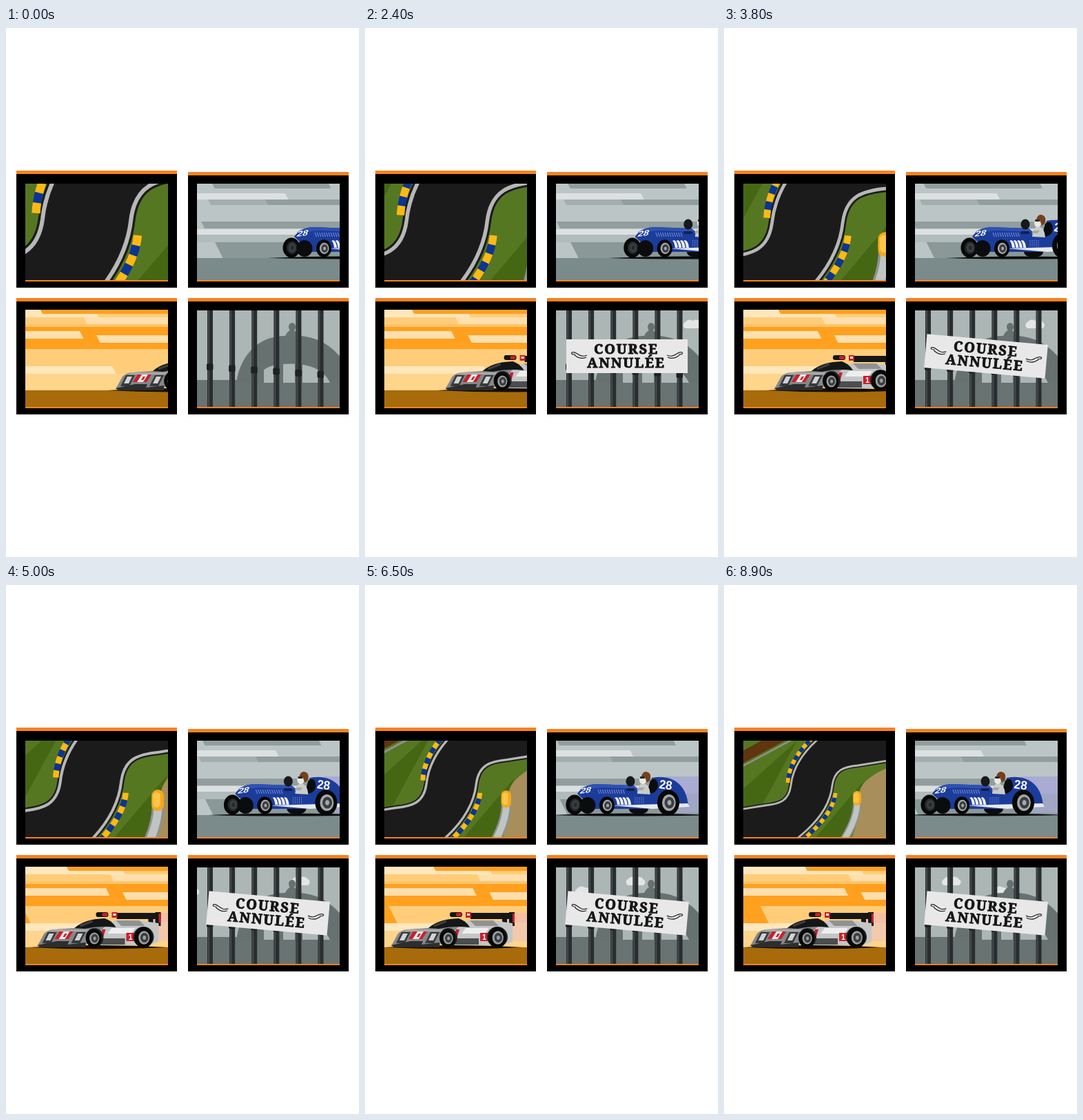
An HTML page for the animation above (9 s loop, 512x768 px).

```html
<!DOCTYPE html>
<html lang="fr">
<head>
<meta charset="utf-8">
<title>Course</title>
<style>
html, body { margin: 0; width: 100%; height: 100%; overflow: hidden; background: #fff; }
body > svg { display: block; width: 100vw; height: 100vh; }
.num { font: bold 18px "Liberation Sans", Arial, sans-serif; fill: #fff; }
.sign { font: bold 20px "Noto Serif", "Liberation Serif", serif; letter-spacing: 1.8px;
  text-anchor: middle; fill: #151515; stroke: #151515; stroke-width: .9px; }
</style>
</head>
<body>
<svg id="stage" viewBox="0 0 512 768" xmlns="http://www.w3.org/2000/svg"></svg>
<script>
const ORANGE = '#f58220';
const LOOP = 9000, STEP = 100;
const FAR = 700;

const path = (fill, d) => `<path fill="${fill}" d="${d}"/>`;
const line = (color, w, d, extra = '') => `<path fill="none" stroke="${color}" stroke-width="${w}" d="${d}" ${extra}/>`;
const rect = (fill, x, y, w, h, r = 0) => `<rect fill="${fill}" x="${x}" y="${y}" width="${w}" height="${h}" rx="${r}"/>`;
const oval = (fill, x, y, rx, ry) => `<ellipse fill="${fill}" cx="${x}" cy="${y}" rx="${rx}" ry="${ry}"/>`;
const group = (id, body) => `<g id="${id}">${body}</g>`;
const repeat = (n, fn) => Array.from({ length: n }, (_, i) => fn(i)).join('');
const number = (text, transform) => `<text class="num" transform="${transform}">${text}</text>`;

// A parallelogram whose lower edge is moved sideways by lean.
const slab = (fill, x, y, w, h, lean) => path(fill, `M${x},${y} h${w} l${lean},${h} h${-w} Z`);
// A speed streak from x0 to x1 with slanted ends.
const streak = (fill, x0, x1, y, h) => slab(fill, x0, y, x1 - x0, h, h / 2);

function panel(x, barY, winY, floor, scene) {
  const h = floor - winY;
  return rect('#000', x, barY, 233, floor + 11 - barY) + rect(ORANGE, x, barY, 233, 5)
    + `<svg x="${x + 13}" y="${winY}" width="207" height="${h}" viewBox="${x + 13} ${winY} 207 ${h}">${scene}</svg>`
    + rect(ORANGE, x + 13, floor, 207, 2);
}

function wheel(x, y, r, rim) {
  return `<g transform="translate(${x} ${y}) scale(${r} ${r * 1.17})">`
    + oval('#080808', 0, 0, 1, 1) + oval(rim, .06, 0, .62, .64)
    + oval('#3a3e41', .1, 0, .44, .46) + oval(rim, .1, 0, .18, .2) + '</g>';
}

// Both verges share one edge; the right one is the left one turned by 180 degrees.
const EDGE = 'M10,328 L60,320 C80,318 94,314 97,291 C99,272 108,250 134,226 L150,212';

function verge(turn, curbY, decor) {
  const spin = a => `transform="rotate(${a} 127 291)"`;
  const curb = `M92.5,${curbY} C94,262 108,238 140,212`;
  return `<g ${spin(turn)}><g clip-path="url(#verge)"><g ${spin(-turn)}>${decor}</g></g>`
    + line('#1b1c1b', 6, EDGE) + line('#b7b7b7', 2.8, EDGE)
    + line('#0b3590', 5.8, curb) + line('#fdb913', 5.8, curb, 'stroke-dasharray="7"') + '</g>';
}

function track() {
  const grass = rect('#567722', 0, 200, 260, 190);
  const rail = 'M193,308 Q196,335 174,370';
  return `<clipPath id="verge"><path d="${EDGE} L10,212 Z"/></clipPath>`
    + rect('#1b1b1b', 0, 200, 260, 190)
    + verge(0, 287, grass
      + path('#456714', 'M28,296 L106,226 L55,320 L28,328 Z')
      + line('#5f3610', 16, 'M10,259 L90,216') + line('#8f918c', 2.6, 'M10,272 L98,225'))
    + verge(180, 280, grass
      + path('#456714', 'M130,370 L203,284 L172,370 Z')
      + path('#a78e5b', 'M245,262 Q196,282 196,304 Q199,335 184,370 H245 Z')
      + line('#8d9290', 12, rail) + line('#c0c4c2', 8, rail)
      + line('#f6a81a', 12, 'M193,305 v9', 'stroke-linecap="round"')
      + line('#fdc54a', 7, 'M192,305 v8', 'stroke-linecap="round"'));
}

function greySky() {
  const light = '#dde0e0', dark = '#929e9e';
  return streak(dark, 299, 468, 226, 7)
    + streak(light, 0, 405, 240, 9)
    + streak('#a4aeae', 293, 378, 249, 8) + streak(dark, 376, FAR, 249, 8)
    + streak(dark, 283, FAR, 281, 10) + streak(light, 0, FAR, 292, 8)
    + streak('#b1bbbb', 0, FAR, 300, 11)
    + streak('#8b9898', 303, FAR, 311, 23);
}

function vintageCar() {
  const blue = '#1c3c9b', black = '#0b0c0e';
  return rect('#a9abd3', 430, 278, 120, 25) + rect('#a0a6c4', 445, 303, 100, 28)
    + path(black, 'M263,334 Q370,329 500,334 Q370,337 263,334 Z')
    + oval(black, 391, 325, 14, 8)
    + wheel(298, 319, 12.5, '#24282a')
    // body, cockpit and tail
    + path(blue, 'M302,303 Q310,290 330,289 L384,291 L397,303 H407 L410,280 C438,274 461,288 463,321 L400,325 H325 Z')
    + path('#2e51b4', 'M306,297 Q316,289 330,289 L384,291 L390,296 L340,294 Z')
    + path(black, 'M402,304 L408,284 Q418,277 419,292 Q418,303 402,304 Z')
    + path('#c9cccb', 'M389,303 Q390,287 399,288 Q407,291 408,304 Z')
    + slab('#a5a9a8', 391, 294, 9, 4, -3)
    // driver
    + oval('#eceae6', 397, 283, 5, 6)
    + path('#74401b', 'M395,279 Q396,271 402,271 Q411,273 407,284 L403,287 L400,279 Z')
    + rect('#22262b', 393, 278, 7, 3, 1)
    + oval('#16181b', 379, 285, 6.5, 7.5)
    + rect('#10204f', 373, 295, 12, 4, 1)
    // vents, sill and exhausts
    + repeat(12, i => line('#8da2df', .9, `M${332 + i * 3.3},297 l2.2,6`))
    + repeat(5, i => line('#6f88d2', 1, `M${386 + i * 3},308 v10`, 'stroke-dasharray="2 1"'))
    + path('#e8eaec', 'M352,320 L462,317 L465,322 L410,325 Z')
    + repeat(4, i => path('#f2f2f2', `M${356 + i * 5.4},309 q3,1 4,10 h4 q-1,-9 -5,-11 Z`))
    + number(28, 'translate(420 295) rotate(8) scale(.95 1)')
    + number(28, 'translate(305 303) rotate(-8) skewX(-28) scale(.8 .6)')
    + oval(black, 317, 320, 11.5, 12)
    + wheel(345, 320, 11, '#a4a8ab') + wheel(434, 316, 16, '#a4a8ab');
}

function orangeSky() {
  const cream = '#ffe6bc', pale = '#ffdfad', hot = '#ffa01e', warm = '#ffcd7a';
  const band = (fill, y, h) => rect(fill, -FAR, y, 2 * FAR, h);
  return band(hot, 409, 6) + streak(cream, -FAR, 50, 409, 6)
    + band(warm, 415, 5) + streak(cream, -FAR, 132, 415, 5)
    + band(pale, 420, 10) + streak(warm, -FAR, 113, 420, 10)
    + band('#ffc469', 430, 4) + band(hot, 434, 32)
    + streak(pale, -FAR, 107, 440, 11) + streak(pale, 131, FAR, 446, 11)
    + band(warm, 466, 36) + streak(hot, -FAR, -15, 466, 25)
    + streak(cream, -FAR, 154, 491, 11)
    + band('#ffd48b', 502, 24);
}

function prototype() {
  const dark = '#151617', red = '#c8202c', grey = '#858788';
  const lamp = x => slab('#37393b', x, 504, 13, 16, -8) + slab('#d0d2d3', x + 2, 506, 7, 10, -5);
  return rect('#f4bfa4', 205, 476, 130, 14) + rect('#f3c9ab', 205, 490, 130, 27)
    + path('#150d04', 'M26,526 Q130,520 228,526 Q130,531 26,526 Z')
    // rear wing and airbox
    + rect(dark, 153, 476, 64, 9) + rect(dark, 209, 475, 8, 20)
    + rect(red, 214, 477, 3, 13) + rect(dark, 199, 484, 7, 12)
    + rect(dark, 123, 475, 18, 7, 3) + rect(red, 132, 476, 8, 5, 2)
    + rect(red, 146, 475, 8, 8) + rect('#f4f4f4', 148, 477, 4, 3)
    // side
    + path('#c4c6c7', 'M128,500 L150,487 H185 L214,491 V518 L200,523 H130 Z')
    + slab('#8f9294', 152, 487, 34, 8, 8)
    + slab('#eeeeee', 146, 498, 34, 8, -6)
    + slab('#4b4d4f', 131, 513, 34, 9, 0)
    // hood and canopy
    + path(grey, 'M38,524 L48,506 Q53,501 62,500 L92,498 Q111,485 125,485 L146,488 L128,503 L107,524 Z')
    + slab('#a7a9aa', 62, 500, 58, 3, -6)
    + path(dark, 'M92,498 Q106,485 136,484 Q147,488 152,497 Q128,494 107,499 Z')
    + line('#3c3f42', 3, 'M100,495 L118,488')
    + slab('#e6e6e6', 72, 503, 17, 11, -7)
    + slab(red, 70, 503, 6, 11, -7) + slab(red, 85, 503, 5, 11, -7) + slab(red, 78, 506, 3, 5, -3)
    + lamp(53) + lamp(95)
    + path('#2c2d2e', 'M38,523 L66,517 H84 L82,522 L108,519 V526 H42 Z')
    + slab(red, 132, 500, 5, 10, -3)
    + rect(red, 167, 505, 12, 12) + number(1, 'translate(170 515) scale(.6)')
    + oval('#232425', 121, 512, 13, 14) + wheel(120, 513, 11.5, '#9b9d9f')
    + oval('#232425', 192, 511, 15, 15) + wheel(192, 512, 13, '#9b9d9f');
}

const puff = w => path('#e3e6e5', `M4,13 A5,5 0 0 1 4,4 A7,6 0 0 1 15,2 A7,6 0 0 1 ${w - 4},4 A5,5 0 0 1 ${w - 4},13 Z`);

function gate() {
  const sky = '#acb6b5', stone = '#667170';
  const bar = i => {
    const x = 292 + i * 32.1;
    return rect('#2a2d2f', x, 410, 8, 140) + rect('#474b4d', x + 1, 410, 2, 140)
      + rect('#1e2022', x - 1, 487 + i * 2.2, 9.5, 10, 2);
  };
  const curl = line('#222', 1.2, 'M305,474 Q298,474 300,471 C307,468 310,480 322,475 M304,475 Q313,482 321,478');
  return rect(sky, 277, 410, 207, 140)
    + group('cloudA', puff(30)) + group('cloudB', puff(25))
    + path(stone, 'M334,515 C340,475 366,447 405,447 C446,443 472,459 490,484 V515 Z')
    + oval(stone, 415, 434, 5, 6) + path(stone, 'M404,450 Q407,440 414,438 Q424,440 424,450 Z')
    + path(sky, 'M364,515 Q368,489 402,488 Q455,484 470,515 Z')
    + repeat(3, i => rect(stone, 363 + i * 28, 486, 11, 29))
    + rect('#687372', 277, 511, 60, 39) + rect('#687372', 277, 515, 207, 35)
    + repeat(6, bar)
    + group('board', rect('#e8e8e8', 292, 452, 176, 49)
      + '<g class="sign"><text x="379" y="473">COURSE</text><text x="379" y="493">ANNULÉE</text></g>'
      + curl + `<g transform="translate(760 0) scale(-1 1)">${curl}</g>`);
}

document.getElementById('stage').innerHTML = panel(15, 207, 226, 366, group('track', track()))
  + panel(264, 209, 226, 366, rect('#bcc5c5', 277, 226, 207, 140) + group('greySky', greySky())
    + rect('#7b8b8b', 277, 334, 207, 32) + group('vintage', vintageCar()))
  + panel(15, 392, 409, 550, group('orangeSky', orangeSky())
    + rect('#a76b0b', 28, 526, 207, 24) + group('proto', prototype()))
  + panel(264, 392, 410, 550, gate());

const sine = (t, start, end) => {
  const p = Math.min(1, Math.max(0, (t - start) / (end - start)));
  return (1 - Math.cos(Math.PI * p)) / 2;
};
const put = (id, value) => document.getElementById(id).setAttribute('transform', value);
const shift = (id, x, y = 0) => put(id, `translate(${x} ${y})`);

function draw(t) {
  const zoom = 2.14 - 1.14 * sine(t, 0, LOOP);
  const drift = (t / LOOP) ** 1.45;
  put('track', `translate(135.6 303) scale(${zoom}) translate(-135.6 -303)`);
  shift('greySky', -33 * drift);
  shift('vintage', 116 * (1 - sine(t, 0, 7600)));
  shift('orangeSky', t * .0076);
  shift('proto', 121 * (1 - sine(t, 0, 5950)));
  shift('cloudA', 486 - 174 * drift, 423);
  shift('cloudB', 155 + 238 * drift, 437);
  const drop = -92 * (1 - sine(t, 1000, 2230));
  put('board', `translate(0 ${drop}) rotate(${5.1 * sine(t, 2500, 3300)} 380.5 476.5)`);
}

function tick() {
  draw(Math.floor(performance.now() % LOOP / STEP) * STEP);
  requestAnimationFrame(tick);
}
tick();
</script>
</body>
</html>
```
